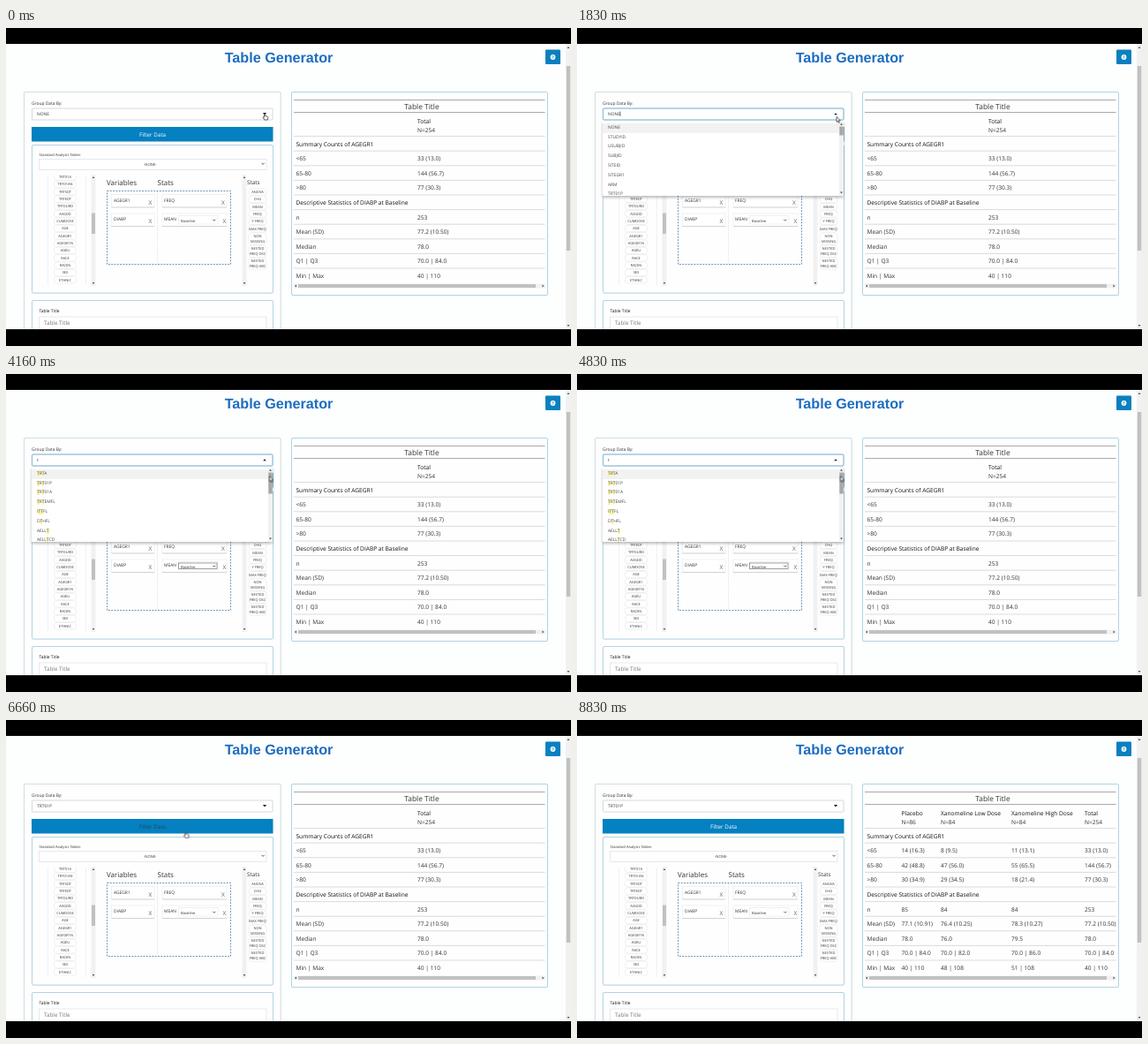
These frames come from a looping animation (640x360 px, 9000 ms). An HTML page:

```html
<!DOCTYPE html>
<html lang="en">
<head>
<meta charset="utf-8">
<title>Table Generator</title>
<style>
html, body { margin: 0; width: 100%; height: 100%; overflow: hidden; background: #000; }
#stage { position: relative; width: 640px; height: 360px; overflow: hidden; }
#stage, text { font-family: "Open Sans", sans-serif; text-rendering: geometricPrecision; }
svg { position: absolute; left: 0; top: 0; }
text { fill: #333; }
.strong { font-weight: 500; fill: #111; }
.card { fill: #fefefe; stroke: #a3cddd; stroke-width: .8; filter: drop-shadow(0 .4px .6px #6aa4bb55); }
.outer { stroke: #ccd9de; }
.field { fill: #fff; stroke: #cbcfd2; stroke-width: .8; }
.faint { stroke: #e0e3e6; }
.focus-ring { fill: none; stroke: #7ab6de; stroke-width: .9; }
.item { fill: #fff; stroke: #e4e6e8; stroke-width: .6; }
.edge { stroke: #c4c8cb; stroke-width: .7; }
.rule { stroke: #d2d2d2; stroke-width: .8; }
.dark { stroke: #939393; }
.track { fill: #f1f1f1; }
.thumb { fill: #c1c1c1; }
.arrow { fill: #555; }
.chevron { fill: none; stroke: #333; stroke-width: .8; }

.menu { position: absolute; left: 29px; top: 104.5px; width: 273px; height: 85px; overflow: hidden;
  background: #fff; box-shadow: 0 2px 3px #0004; color: #444; font-size: 4.9px; }
.menu.short { height: 48.5px; }
.menu div { position: absolute; left: 0; width: 262px; height: 10.8px; padding-left: 6px; line-height: 10.8px; white-space: nowrap; }
.menu.short div { width: 267px; }
.menu div:first-child { background: #f2f2f2; }
.menu mark { background: #fbf3a0; color: inherit; }
.menu svg { left: 268px; }

.win { visibility: hidden; animation: 9s step-end infinite; }
.closed { animation-name: closed; }
.open { animation-name: open; }
.all { animation-name: all; }
.one { animation-name: one; }
.two { animation-name: two; }
.three { animation-name: three; }
.typed { animation-name: typed; }
.focus { animation-name: focus; }
.chosen { animation-name: chosen; }
.idle { animation-name: idle; }
.hover { animation-name: hover; }
.before { animation-name: before; }
.after { animation-name: after; }
.hand { animation-name: hand; }
.beam { animation-name: beam; }
.pointer { animation-name: pointer; }
.busy { animation-name: busy; }
@keyframes closed { 0% { visibility: visible } 16.67% { visibility: hidden } }
@keyframes open { 16.67% { visibility: visible } 68.5% { visibility: hidden } }
@keyframes all { 16.67% { visibility: visible } 40.67% { visibility: hidden } }
@keyframes one { 40.67% { visibility: visible } 55.6% { visibility: hidden } }
@keyframes two { 55.6% { visibility: visible } 57.4% { visibility: hidden } }
@keyframes three { 57.4% { visibility: visible } 68.5% { visibility: hidden } }
@keyframes typed { 55.6% { visibility: visible } 68.5% { visibility: hidden } }
@keyframes focus { 40.67% { visibility: visible } 68.5% { visibility: hidden } }
@keyframes chosen { 68.5% { visibility: visible } }
@keyframes idle { 0% { visibility: visible } 72.2% { visibility: hidden } 85.2% { visibility: visible } }
@keyframes hover { 72.2% { visibility: visible } 85.2% { visibility: hidden } }
@keyframes before { 0% { visibility: visible } 83.3% { visibility: hidden } }
@keyframes after { 83.3% { visibility: visible } }
@keyframes hand { 0% { visibility: visible } 3.7% { visibility: hidden } 57.4% { visibility: visible } 87% { visibility: hidden } }
@keyframes beam { 3.7% { visibility: visible } 18.5% { visibility: hidden } }
@keyframes pointer { 18.5% { visibility: visible } 57.4% { visibility: hidden } }
@keyframes busy { 27.7% { visibility: visible } 35.2% { visibility: hidden } }
#cursor { animation: travel 9s linear infinite; }
@keyframes travel {
  0%, 18.5% { transform: translate(293px, 97px) }
  27.7%, 35% { transform: translate(298px, 113px) }
  40%, 55.5% { transform: translate(298.5px, 115.5px) }
  61%, 65% { transform: translate(252.5px, 114.5px) }
  67%, 69% { transform: translate(240px, 122px) }
  73%, 83% { transform: translate(203.5px, 126.5px) }
  87%, 100% { transform: translate(240px, 160px) }
}
</style>
</head>
<body>
<div id="stage">
<svg id="page" width="640" height="360">
  <rect width="640" height="360" fill="#fdfefe"/>
  <text x="309" y="39" text-anchor="middle" style="font:bold 16.15px 'Liberation Sans',Arial,sans-serif;fill:#1c6dc0">Table Generator</text>
  <rect x="611" y="24.5" width="17" height="16.5" rx="1" fill="#0a80bf"/>
  <circle cx="619.5" cy="33" r="2.9" fill="#fff"/>
  <text x="619.5" y="34.8" text-anchor="middle" font-size="5" font-weight="700" style="fill:#0a80bf">?</text>
  <rect class="track" x="634" y="18" width="6" height="323"/>
  <rect class="thumb" x="634.8" y="43" width="4.4" height="209"/>
  <path class="arrow" d="M635.5 23l1.5-2 1.5 2zM635.5 336l1.5 2 1.5-2z"/>

  <rect class="card outer" x="20.5" y="72.5" width="290.5" height="290" rx="1.5"/>
  <rect class="card" x="323.5" y="72.5" width="290" height="230" rx="1.5"/>
  <rect class="card" x="29.5" y="132.5" width="273" height="167.5" rx="1.5"/>
  <rect class="card" x="29.5" y="308.5" width="273" height="50" rx="1.5"/>

  <rect class="field" x="29.5" y="91" width="272.5" height="13" rx="1"/>
  <rect class="focus-ring win open" x="29.5" y="91" width="272.5" height="13" rx="1"/>
  <path class="win closed" d="M291 96h4l-2 2.4z"/>
  <path class="win open" d="M291.3 98.2h3.4l-1.7-2z"/>
  <path class="win chosen" d="M291 96h4l-2 2.4z"/>
  <path class="win all" d="M49 94.5v5.5" stroke="#222" stroke-width=".6"/>
  <path class="win three" d="M40.3 94.5v5.5" stroke="#222" stroke-width=".6"/>
  <rect x="29" y="112" width="273.5" height="16.5" fill="#0580c0"/>

  <rect class="field faint" x="37.5" y="148.5" width="257.5" height="12"/>
  <path class="chevron" d="M289.5 152.8l1.6 1.6 1.6-1.6"/>
  <path class="rule" d="M47.5 167v124M90.5 167v124" style="stroke:#eceeef"/>
  <rect class="track" x="96.5" y="166" width="5" height="126"/>
  <rect class="thumb" x="97" y="209.5" width="4" height="23.5"/>
  <path class="arrow" d="M97.6 170l1.4-2 1.4 2zM97.6 288l1.4 2 1.4-2z"/>
  <rect class="track" x="267.5" y="166" width="5" height="126"/>
  <path class="arrow" d="M268.6 170l1.4-2 1.4 2zM268.6 288l1.4 2 1.4-2z"/>
  <rect x="114.5" y="184.5" width="140" height="83" fill="#fefefe" stroke="#4779a6" stroke-width=".8" stroke-dasharray="1.9 1.4"/>
  <path d="M171.5 185v82" stroke="#d0d6da" stroke-width=".7" stroke-dasharray="1 1"/>
  <rect class="item" x="119.5" y="188.5" width="48.5" height="14.5"/>
  <rect class="item" x="177" y="188.5" width="73" height="14.5"/>
  <rect class="item" x="119.5" y="210" width="48.5" height="14.5"/>
  <rect class="item" x="177" y="210" width="73" height="14.5"/>
  <path class="edge" d="M119.5 203h48.5M177 203h73M119.5 224.5h48.5M177 224.5h73"/>
  <rect class="item" x="195.5" y="212.5" width="44.5" height="9.5"/>
  <rect class="win focus" x="195.5" y="214" width="43.5" height="6.5" fill="none" stroke="#777" stroke-width=".7"/>
  <path class="chevron" d="M234.3 216.8l1.5 1.5 1.5-1.5"/>
  <rect class="field faint" x="37.5" y="327" width="257.5" height="20"/>

  <path class="rule dark" d="M326 81.5h284.5M326 95.5h284.5"/>
  <rect class="track" x="326" y="289.5" width="285" height="5"/>
  <rect class="thumb" x="331" y="290" width="269" height="4"/>
  <path class="arrow" d="M329 290.6l-2 1.4 2 1.4zM607.5 290.6l2 1.4-2 1.4z"/>
</svg>

<div class="menu win all" data-items="NONE STUDYID USUBJID SUBJID SITEID SITEGR1 ARM TRT01P" data-thumb="10"></div>
<div class="menu win one" data-items="TRTA TRT01P TRT01A TRTEMFL ITTFL DTHFL AELLT AELLTCD" data-match="T" data-thumb="24"></div>
<div class="menu short win typed" data-items="TRTA TRT01P TRT01A TRTEMFL" data-match="TRT"></div>

<svg width="640" height="360">
  <g id="cursor" fill="#fff" stroke="#222" stroke-width=".7" stroke-linejoin="round">
    <path class="win hand" d="M-.6.4Q0-.8.6.4V2.6L3.3 3.3Q4 3.6 3.8 4.6L3.2 7H-.2L-2 4.2Q-2 3.4-.6 4.2Z"/>
    <path class="win beam" fill="none" d="M-1.4-2.8H1.4M0-2.8V2.8M-1.4 2.8H1.4M-1.2 0H1.6"/>
    <path class="win pointer" d="M0 0V6.2L1.4 5 2.4 7.2 3.3 6.8 2.4 4.6H4.2Z"/>
    <circle class="win busy" cx="4.8" cy="3" r="1.9" stroke="#1f8fd0" stroke-width="1.2"/>
  </g>
  <path d="M0 0h640v18H0zM0 341h640v19H0z"/>
</svg>
</div>

<script>
const page = document.getElementById("page");

function add(tag, attrs, content = "") {
  const el = document.createElementNS("http://www.w3.org/2000/svg", tag);
  for (const key in attrs) el.setAttribute(key, attrs[key]);
  el.textContent = content;
  page.append(el);
}
function label(content, x, y, size, extra = {}) {
  add("text", { x, y, "font-size": size, ...extra }, content);
}
const middle = { "text-anchor": "middle" };

// Form
label("Group Data By:", 29, 87, 4.9);
label("NONE", 35, 99.2, 4.9, { class: "win closed" });
label("NONE", 35, 99.2, 4.9, { class: "win all" });
label("t", 35, 99.2, 4.9, { class: "win one" });
label("tr", 35, 99.2, 4.9, { class: "win two" });
label("trt", 35, 99.2, 4.9, { class: "win three" });
label("TRT01P", 35, 99.2, 4.9, { class: "win chosen" });
label("Filter Data", 166, 122.7, 6.3, { ...middle, class: "win idle", style: "fill:#fff" });
label("Filter Data", 166, 122.7, 6.3, { ...middle, class: "win hover", style: "fill:#24455a" });
label("Standard Analysis Tables", 37.5, 145.4, 4.1);
label("-NONE-", 163.3, 155.5, 4.2, middle);
label("Variables", 114, 178, 8);
label("Stats", 171.5, 178, 8);
label("Stats", 273, 177, 6.3);
label("AGEGR1", 122, 197.2, 4.9);
label("FREQ", 179, 197.2, 4.9);
label("DIABP", 122, 218, 4.9);
label("MEAN", 179, 218, 4.9);
label("Baseline", 198, 219.5, 4.2);
for (const [x, y] of [[163.5, 199.6], [245.8, 199.6], [163.5, 220.5], [247.5, 220.5]])
  label("X", x, y, 6.6, { ...middle, style: "fill:#666" });
label("Table Title", 37.5, 322, 4.9, { style: "fill:#111" });
label("Table Title", 43, 336, 6.3, { style: "fill:#777" });

// Draggable chips
function chip(lines, x, y, width) {
  const height = 1.8 + 5.7 * lines.length;
  add("rect", { class: "item", x: x - width / 2, y: y - 3.7, width, height, rx: 3 });
  lines.forEach((line, i) => label(line, x, y + 1.4 + i * 5.7, 4, middle));
}
"TRT01A TRT01AN TRTSDT TRTEDT TRTDURD AVGDD CUMDOSE AGE AGEGR1 AGEGR1N AGEU RACE RACEN SEX ETHNIC"
  .split(" ").forEach((name, i) => chip([name], 67, 168.6 + i * 8.33, 25));
add("rect", { x: 52, y: 161.5, width: 32, height: 5, fill: "#fefefe" });
"ANOVA,CHG,MEAN,FREQ,Y FREQ,MAX FREQ".split(",")
  .forEach((name, i) => chip([name], 285, 185.5 + i * 8.33, 20));
["NON/MISSING", "NESTED/FREQ DSC", "NESTED/FREQ ABC"]
  .forEach((name, i) => chip(name.split("/"), 285, 235.8 + i * 14, 20));

// Results table
label("Table Title", 471, 92.3, 8.4, middle);
const columns = [367.5, 412, 492, 575];
const heads = ["Placebo", "Xanomeline Low Dose", "Xanomeline High Dose", "Total"];
const counts = ["N=86", "N=84", "N=84", "N=254"];
const rows = `Summary Counts of AGEGR1
<65;14 (16.3);8 (9.5);11 (13.1);33 (13.0)
65-80;42 (48.8);47 (56.0);55 (65.5);144 (56.7)
>80;30 (34.9);29 (34.5);18 (21.4);77 (30.3)
Descriptive Statistics of DIABP at Baseline
n;85;84;84;253
Mean (SD);77.1 (10.91);76.4 (10.25);78.3 (10.27);77.2 (10.50)
Median;78.0;76.0;79.5;78.0
Q1 | Q3;70.0 | 84.0;70.0 | 82.0;70.0 | 86.0;70.0 | 84.0
Min | Max;40 | 110;48 | 108;51 | 108;40 | 110`.split("\n").map(row => row.split(";"));

function cells(values, y, style = "") {
  values.forEach((value, i) => label(value, columns[i], y, 6.6, { class: "win after " + style }));
  label(values[3], 466, y, 6.6, { class: "win before " + style });
}
cells(heads, 108.2, "strong");
cells(counts, 117.6);
rows.forEach(([name, ...values], i) => {
  const y = 133.6 + i * 16.6;
  add("path", { class: "rule", d: `M326 ${y - 11}h284.5` });
  label(name, 328.5, y, 6.6, { class: values.length ? "" : "strong" });
  if (values.length) cells(values, y);
});

// Dropdown lists
for (const menu of document.querySelectorAll(".menu")) {
  const { items, match, thumb } = menu.dataset;
  menu.innerHTML = items.split(" ").map((name, i) => {
    const text = match ? name.replaceAll(match, `<mark>${match}</mark>`) : name;
    return `<div style="top:${3.3 + i * 10.8}px">${text}</div>`;
  }).join("");
  if (thumb) menu.innerHTML += `<svg width="5" height="85"><rect class="track" y="1.5" width="5" height="83"/>
    <rect x=".3" y="6.5" width="4.5" height="${thumb}" fill="#a8a8a8"/>
    <path class="arrow" d="M1 4.7l1.5-2 1.5 2zM1 80.5l1.5 2 1.5-2z"/></svg>`;
}
</script>
</body>
</html>
```
